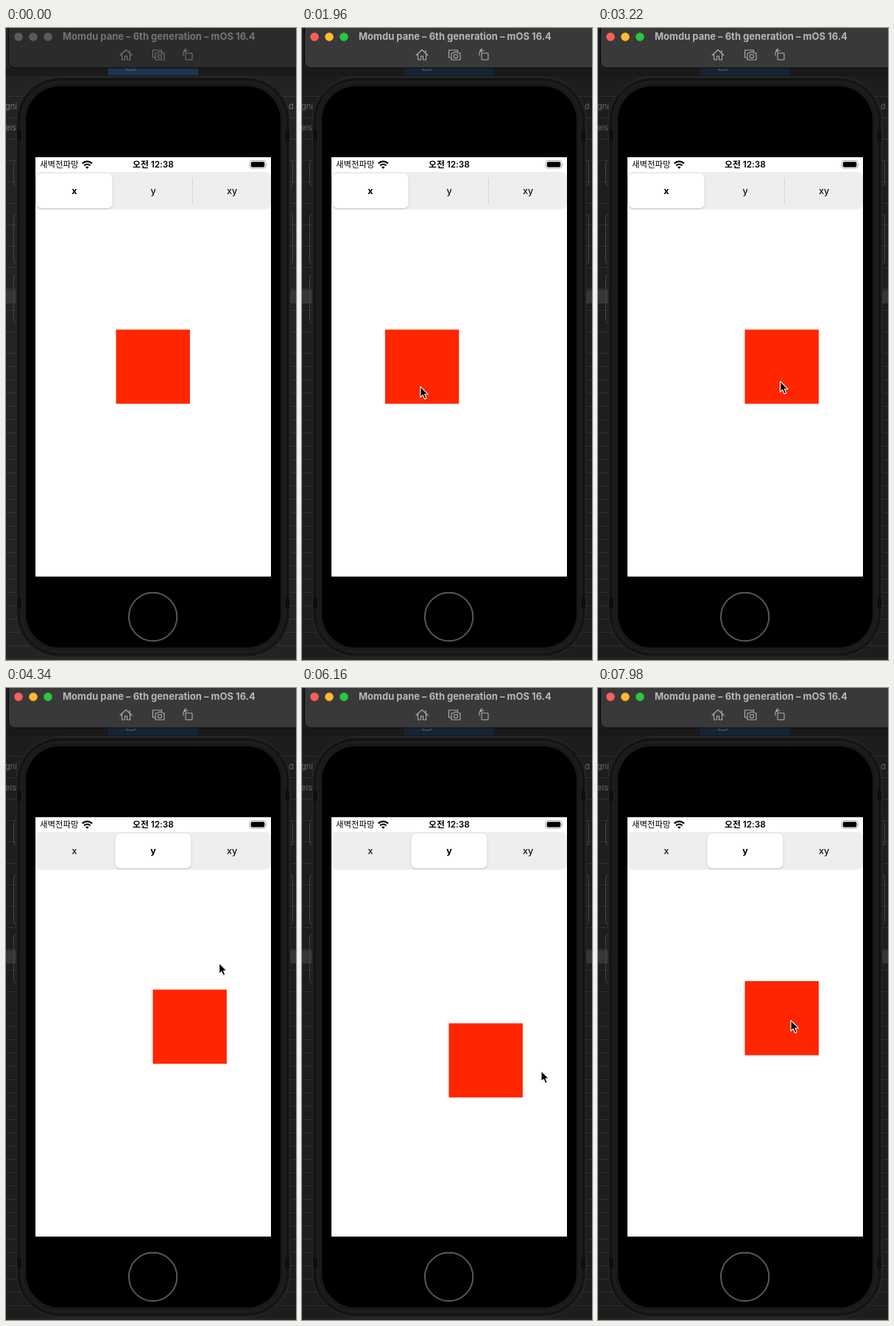
Recreate the animation shown at these times as an HTML page. Size 394 by 856 pixels, loop 8 s.

```html
<!DOCTYPE html>
<html lang="ko">
<head>
<meta charset="utf-8">
<title>Drag demo</title>
<style>
  html, body { margin: 0; width: 100%; height: 100%; overflow: hidden; background: #222; }
  svg { display: block; width: 394px; height: 856px; }
  text { font-family: Inter, "Noto Sans CJK KR", "Noto Sans CJK", sans-serif; }
  .desk { fill: #232323; }
  .rule { stroke: #383636; }
  .bar { fill: #2c2b2b; }
  .blue { fill: #1d3550; }
  .dot { fill: #5b5a5a; }
  .title { fill: #757474; font-size: 13px; font-weight: 700; }
  .icons { stroke: #777676; fill: none; stroke-width: 1.1; stroke-linejoin: round; stroke-linecap: round; }
  .faint { fill: #777; font-size: 11px; }
  .active .desk { fill: #1d1d1d; }
  .active .rule { stroke: #303030; }
  .active .bar { fill: #3a3939; }
  .active .blue { fill: #152435; }
  .active .title { fill: #b9b8b8; }
  .active .icons { stroke: #b0afaf; }
  .active .faint { fill: #666; }
  .active .dot:nth-of-type(1) { fill: #ff5f57; }
  .active .dot:nth-of-type(2) { fill: #febc2e; }
  .active .dot:nth-of-type(3) { fill: #28c840; }
  .tab { font-size: 12.5px; font-weight: 500; text-anchor: middle; fill: #111; }
  .tab.sel { font-weight: 700; fill: #000; }
  #thumb { filter: drop-shadow(0 1px 1.5px rgba(0, 0, 0, .18)); }
</style>
</head>
<body>
<svg id="stage" viewBox="0 0 394 856">
  <rect class="desk" width="394" height="856"/>
  <g id="rules" class="rule"></g>
  <rect y="355" width="394" height="18" fill="#363636"/>
  <g fill="none" stroke="#474747">
    <rect x="10.5" y="179.5" width="379" height="33" rx="3"/>
    <rect x="10.5" y="253.5" width="379" height="66" rx="3"/>
    <path d="M30 334.5H13.5a3 3 0 0 0-3 3v59a3 3 0 0 0 3 3H30"/>
  </g>
  <text class="faint" x="-1" y="110">gni</text>
  <text class="faint" x="-1" y="139">els</text>
  <text class="faint" x="384" y="110">d</text>

  <rect y="54" width="394" height="11" fill="#171717" opacity=".6"/>
  <rect class="blue" x="139" y="54" width="122" height="10"/>
  <path d="M164 54v3h11v-3" fill="none" stroke="#5b6671"/>

  <path class="bar" d="M4 0H394V54H12a8 8 0 0 1-8-8z"/>
  <path d="M3.5 0V46a8 8 0 0 0 8 8H394" fill="none" stroke="#090909"/>
  <g>
    <circle class="dot" cx="17" cy="12" r="5.8"/>
    <circle class="dot" cx="37" cy="12" r="5.8"/>
    <circle class="dot" cx="57" cy="12" r="5.8"/>
  </g>
  <text class="title" x="77" y="16.3">Momdu pane – 6th generation – mOS 16.4</text>
  <g class="icons">
    <path d="M155 37l8-7.5 8 7.5M157.5 35.5v7.5h4v-5h3v5h4v-7.5M168 33v-2.5"/>
    <path d="M202 40h-2.5v-10h12v2.5M203 34h3l1-1.5h4l1 1.5h3v9h-12z"/>
    <circle cx="209" cy="38.3" r="2.5"/>
    <rect x="244" y="34" width="9" height="9" rx="1"/>
    <path d="M241 37v-3q0-3.5 4-3.5h2M244.5 28l-2.5 2.5 2.5 2.5"/>
  </g>

  <rect x="14" y="66.5" width="372" height="785.5" rx="59" fill="#181818" stroke="#2e2e2e"/>
  <rect x="17.5" y="70" width="365" height="778.5" rx="56" fill="#1b1b1b" stroke="#0b0b0b"/>
  <rect x="22" y="74" width="356" height="770" rx="51" fill="#191919" stroke="#222"/>
  <path d="M15 139h6v14h-6zM379 139h6v14h-6zM15 772h6v14h-6zM379 772h6v14h-6z" fill="#0e0e0e"/>
  <rect x="27" y="79" width="346" height="760" rx="46"/>
  <circle cx="199.6" cy="797.5" r="32.7" fill="none" stroke="#585858" stroke-width="2"/>

  <rect x="40" y="175" width="320" height="568" fill="#fff"/>
  <text x="46" y="189" font-size="11.4">새벽전파망</text>
  <path d="M103.5 183.5q6.8-5.8 13.6 0M106 186.3q4.3-3.6 8.6 0" fill="none" stroke="#000" stroke-width="2"/>
  <path d="M108 188.3q2.3-1.8 4.6 0l-2.3 2.5z"/>
  <text x="200" y="189.2" font-size="11.8" font-weight="600" text-anchor="middle">오전 12:38</text>
  <rect x="331" y="179.5" width="22" height="10.5" rx="3" fill="none" stroke="#aaa"/>
  <rect x="332.7" y="181.2" width="18.6" height="7.2" rx="1.7"/>
  <path d="M354.5 183q1.5 1.8 0 3.6z" fill="#aaa"/>

  <rect x="40" y="195" width="320" height="51" rx="8" fill="#eeeeef"/>
  <path id="divider" d="M253.5 203v36" stroke="#d5d5d8"/>
  <rect id="thumb" x="41.5" y="197" width="103" height="47" rx="7" fill="#fff"/>
  <text class="tab" x="93" y="225">x</text>
  <text class="tab" x="200" y="225">y</text>
  <text class="tab" x="307" y="225">xy</text>

  <rect id="box" x="-.5" y="-.5" width="100.4" height="100.4" fill="#ff2600"/>
  <path id="cursor" d="M0 0V14.5L3.3 11.5 5.7 17 8.2 15.9 5.9 10.5H10.4Z" stroke="#fff" stroke-width="1.1" stroke-linejoin="round"/>
</svg>
<script>
const LOOP = 8000, STEP = 70;
const ACTIVATE = 840, PICK = 3990, CATCH = 140;
const X = 0, Y = 1;
const $ = id => document.getElementById(id);

// Hand movements: start, time per point, points to reach
const strokes = [
  [70, 490, [338, 57]],
  [630, 210, [300, 14], [242, 336]],
  [1120, 280, [197.5, 464]],
  [1400, 70, [149.5, 470], [87.5, 493]],
  [1610, 786, [264.5, 475]],
  [2396, 228, [146.5, 476], [284.5, 479], [247.5, 478.5]],
  [3290, 560, [200, 213]],
  [4130, 280, [305, 400], [285, 473]],
  [4900, 230, [265, 360]],
  [5130, 610, [305, 539]],
  [5740, 210, [370, 509.2], [325, 518.5], [92, 525], [193, 555]],
  [6580, 210, [241, 576]],
  [6860, 210, [223, 371], [257, 560]],
  [7420, 210, [260, 518]],
  [7700, 210, [262, 444]],
  [7910, 70, [262, 450.2]]
];

const drags = [
  { axis: X, from: 1400, to: 3080, grab: 47.5 },
  { axis: Y, from: 4900, to: 5950, grab: 54.5 },
  { axis: Y, from: 7700, to: LOOP, grab: 52.7 }
];

const clamp = u => Math.min(1, Math.max(0, u));
const ease = u => (1 - Math.cos(Math.PI * clamp(u))) / 2;
const mix = (a, b, u) => a + (b - a) * u;

function cursorAt(t) {
  let pos = [66, 870];
  for (const [start, beat, ...points] of strokes) {
    points.forEach((point, i) => {
      const u = ease((t - start) / beat - i);
      pos = pos.map((p, axis) => mix(p, point[axis], u));
    });
  }
  return pos;
}

// The box follows the cursor on one axis, after a short catch-up
function boxAt(t) {
  const pos = [150, 409];
  for (const { axis, from, to, grab } of drags) {
    const goal = cursorAt(Math.min(t, to))[axis] - grab;
    pos[axis] = mix(pos[axis], goal, clamp((t - from) / CATCH) ** 2);
  }
  return pos;
}

const place = (el, [x, y]) => el.setAttribute("transform", `translate(${x} ${y})`);

let rules = "";
for (let y = 92; y < 856; y += y < 440 ? 29 : 18) rules += `M0 ${y + .5}H394`;
$("rules").innerHTML = `<path d="${rules}"/>`;

const tabs = document.querySelectorAll(".tab");

function draw(time) {
  const t = Math.floor(time % LOOP / STEP) * STEP;
  const picked = t >= PICK;
  const slide = 1 - (1 - clamp((t - PICK) / 310)) ** 3;
  $("stage").classList.toggle("active", t >= ACTIVATE);
  $("thumb").setAttribute("x", mix(41.5, 148.5, slide));
  $("divider").setAttribute("opacity", 1 - slide);
  tabs[0].classList.toggle("sel", !picked);
  tabs[1].classList.toggle("sel", picked);
  place($("box"), boxAt(t));
  place($("cursor"), cursorAt(t));
}

const start = performance.now();
function tick() {
  draw(performance.now() - start);
  requestAnimationFrame(tick);
}
tick();
</script>
</body>
</html>
```
